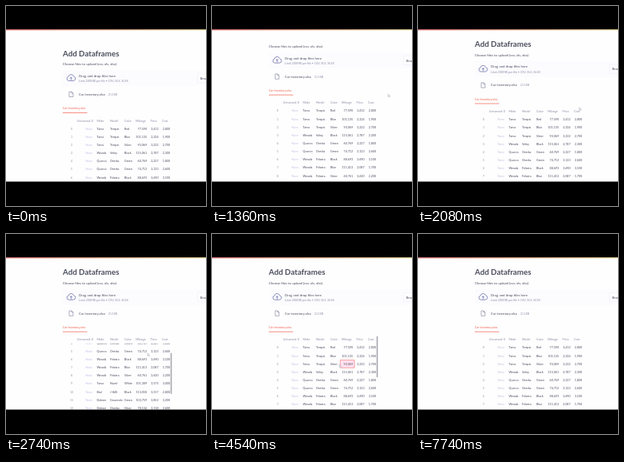
These frames come from a looping animation (250x250 px, 8000 ms). An HTML page with a canvas:

```html
<!DOCTYPE html>
<html lang="en">
<head>
<meta charset="utf-8">
<title>Add Dataframes</title>
<style>
  html, body { margin: 0; width: 100%; height: 100%; overflow: hidden; background: #000; }
  canvas { display: block; }
</style>
</head>
<body>
<canvas id="stage" width="250" height="250"></canvas>
<script>
const ctx = document.getElementById('stage').getContext('2d');
const LOOP = 8000, ROW = 10.15;
const INK = '#4b4d5c', GRAY = '#8d8fa4', FAINT = '#c3c4e0', RED = '#f0604f', PAGE = '#fefeff';

const colors = 'Red Blue Silver Black Green Green Black Blue Silver White Black Green Silver'.split(' ');
const cars = ['Tarvo Tempis', 'Tarvo Tempis', 'Tarvo Tempis', 'Wexola Velny', 'Quorva Oreska', 'Quorva Oreska',
  'Wexola Felosta', 'Wexola Felosta', 'Wexola Felosta', 'Tarvo Nuvel', 'Brul J-840', 'Dalmer Gravendo', 'Dalmer Osteba'];

// Repeatable noise in 0..1
const noise = n => Math.abs(Math.sin(n * 127.1 + 11.7) * 43758.5453) % 1;
const thousands = n => Math.round(n).toLocaleString('en-US');

const rows = cars.map((car, i) => {
  const price = 2000 + 2000 * noise(i + 50);
  return [...car.split(' '), colors[i], thousands(60000 + 60000 * noise(i)),
    thousands(price), thousands(Math.floor(price * 0.0085) * 100)];
});

const columns = [
  { label: 'Make', x: 113.5 }, { label: 'Model', x: 130 }, { label: 'Color', x: 148 },
  { label: 'Mileage', x: 162, right: 176 }, { label: 'Price', x: 180.5, right: 190.5 }, { label: 'Cost', x: 195, right: 205 },
];

// Smooth step from 0 to 1 between two times
function ramp(t, from, to) {
  const p = Math.min(1, Math.max(0, (t - from) / (to - from)));
  return p * p * (3 - 2 * p);
}

function text(str, x, y, size, color = INK, align = 'left', weight = 400) {
  ctx.font = `${weight} ${size}px Lato, sans-serif`;
  ctx.textAlign = align;
  ctx.fillStyle = color;
  ctx.fillText(str, x, y);
}

function rect(x, y, w, h, color) {
  ctx.fillStyle = color;
  ctx.fillRect(x, y, w, h);
}

function outline(path, color, width = 0.7) {
  ctx.strokeStyle = color;
  ctx.lineWidth = width;
  ctx.stroke(new Path2D(path));
}

function clipped(x, y, w, h, draw) {
  ctx.save();
  ctx.beginPath();
  ctx.rect(x, y, w, h);
  ctx.clip();
  draw();
  ctx.restore();
}

function drawUploader() {
  text('Add Dataframes', 71, 62.6, 9.75, INK, 'left', 700);
  text('Choose files to upload (csv, xls, xlsx)', 71, 74.4, 4.3);

  rect(71, 80, 179, 20, '#fcfcff');
  outline('M78.3 93.4a2.6 2.6 0 0 1-.2-5.1a3.4 3.4 0 0 1 6.5-.4a2.8 2.8 0 0 1-.3 5.5zM81.4 92.6v-3.6m-1.5 1.4l1.5-1.5l1.5 1.5', '#7d83b0', 0.9);
  text('Drag and drop files here', 91, 88.8, 4.4);
  text('Limit 200MB per file • CSV, XLS, XLSX', 91, 95.4, 3.65, GRAY);
  rect(239.5, 84.5, 11, 11, PAGE);
  outline('M250 84.5h-10.5v11H250', '#f0f0f6');
  text('Browse files', 242.4, 91.8, 4.2);

  outline('M79 107.2h3l1.9 1.9v4.4h-4.9zM82 107.2v1.9h1.9', GRAY);
  text('Car inventory.xlsx', 91, 111.8, 4.2);
  text('21.1KB', 128, 111.8, 3.4, GRAY);

  text('Car Inventory.xlsx', 71, 129.2, 3.6, RED);
  rect(71, 133, 30.5, 0.7, RED);
}

function drawRow(row, i, y, selected) {
  if (selected) {
    rect(160, y - 5, 18.3, ROW, '#ffe0f2');
    outline(`M160.3 ${y - 4.8}h17.8v${ROW - 0.5}h-17.8z`, RED, 0.5);
  }
  text(i, 82, y + 1.3, 3.5, GRAY, 'center');
  text('None', 108, y + 1.3, 3.5, FAINT, 'right');
  columns.forEach(({ x, right }, c) =>
    text(row[c], right || x, y + 1.3, 3.65, INK, right ? 'right' : 'left'));
}

function drawTable(scroll, selected, barAlpha) {
  clipped(75, 148, 133, 120, () => rows.forEach((row, i) =>
    drawRow(row, i, 153.3 + i * ROW - scroll, selected && i === 2)));
  text('Unnamed: 0', 109, 144.6, 3.8, GRAY, 'right');
  columns.forEach(({ label, x }) => text(label, x, 144.6, 3.7, GRAY));
  ctx.globalAlpha = barAlpha;
  rect(205.7, 139.2 + scroll * 0.45, 1.6, 51, '#a8a8ae');
  ctx.globalAlpha = 1;
}

function drawCursor(x, y) {
  ctx.save();
  ctx.translate(x, y);
  const arrow = 'M0 0v3.4l.8-.7l.7 1.2l.6-.3l-.6-1.2h1.1z';
  ctx.fillStyle = '#fff';
  ctx.fill(new Path2D(arrow));
  outline(arrow, GRAY, 0.4);
  ctx.restore();
}

function draw(t) {
  const pageScroll = 29 * ramp(t, 1100, 1480) - 17.8 * ramp(t, 1750, 2100);
  const tableScroll = 46.3 * (ramp(t, 2250, 2680) - ramp(t, 2900, 3350));
  const barAlpha = ramp(t, 2200, 2300) - ramp(t, 4900, 5200);
  const selected = t >= 3560 && t < 4800;

  // The pointer enters, moves to the table, picks a cell and leaves
  const enter = ramp(t, 400, 820), reach = ramp(t, 1900, 2300);
  const pick = ramp(t, 2900, 3500), leave = ramp(t, 4800, 5240);
  const cursorX = 252 - 32 * enter - 43 * reach - 18 * pick + 93 * leave;
  const cursorY = 122 - 12 * enter + 39 * reach + 14 * pick + 27 * leave;

  // The letterboxed page has half-covered edge rows
  rect(0, 0, 250, 250, '#000');
  rect(0, 29.5, 250, 190, PAGE);
  clipped(0, 42.5, 250, 177, () => {
    ctx.save();
    ctx.translate(0, -pageScroll);
    drawUploader();
    drawTable(tableScroll, selected, barAlpha);
    ctx.restore();
    drawCursor(cursorX, cursorY);
  });

  const bar = ctx.createLinearGradient(0, 0, 250, 0);
  bar.addColorStop(0, '#ff4b4b');
  bar.addColorStop(1, '#ffdd78');
  rect(0, 29.5, 250, 0.8, bar);
}

function tick() {
  draw(performance.now() % LOOP);
  requestAnimationFrame(tick);
}
tick();
</script>
</body>
</html>
```
